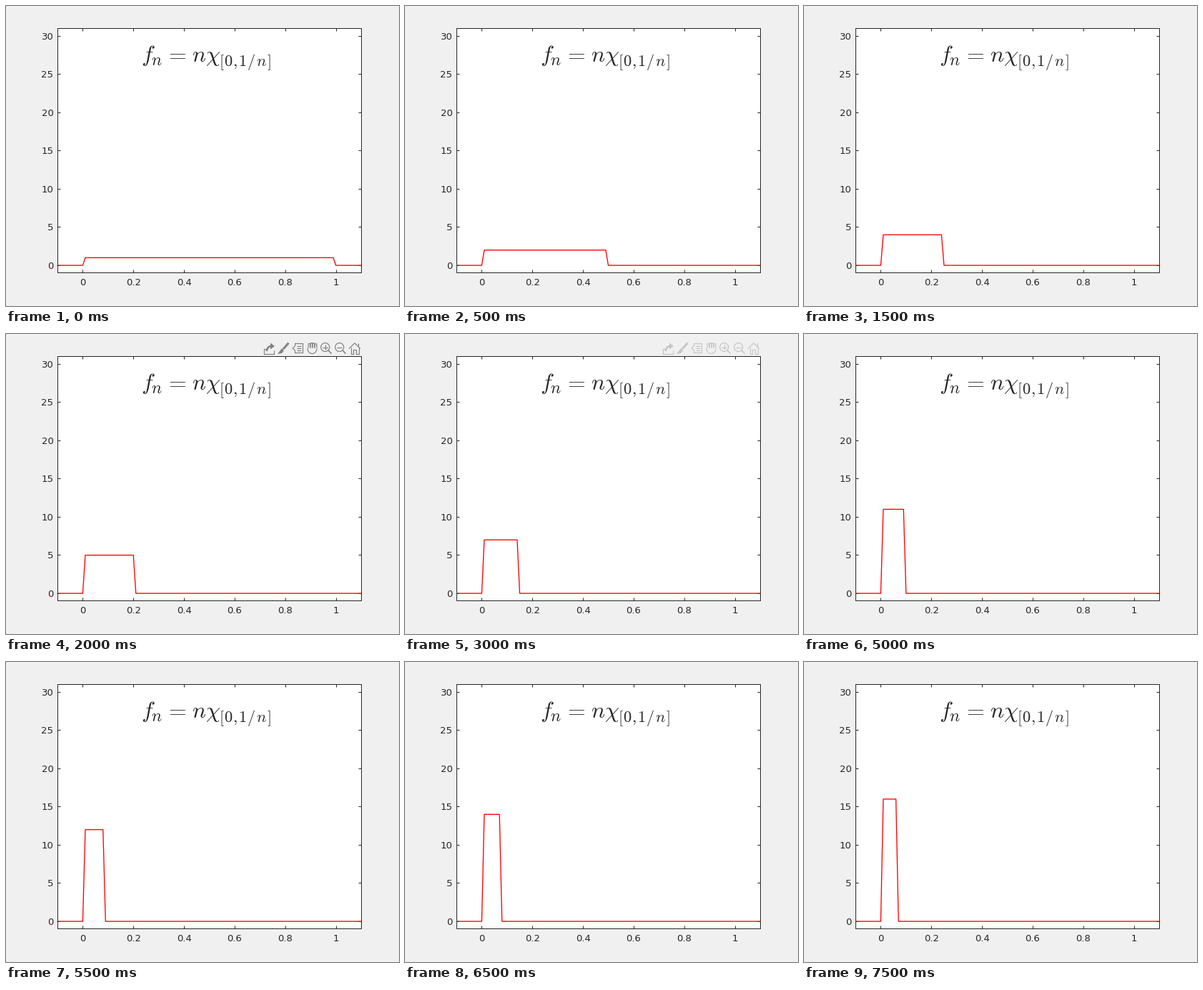
Recreate the animation shown at these times as a matplotlib script. Size 550 px wide and 420 px high, loop 8000 ms.

```python
import matplotlib.pyplot as plt
import numpy as np
from matplotlib.animation import FuncAnimation
from matplotlib.transforms import Affine2D

plt.rcParams.update({"font.family": "DejaVu Sans", "mathtext.fontset": "cm"})

W, H, DPI = 550, 420, 100
PX = 72 / DPI  # points per pixel
INK = "#262626"
LEFT, RIGHT, TOP, BOTTOM = 72, 497, 31.05, 373.45

fig = plt.figure(figsize=(W / DPI, H / DPI), dpi=DPI, facecolor="#f0f0f0")

# Plot
ax = fig.add_axes([LEFT / W, 1 - BOTTOM / H, (RIGHT - LEFT) / W, (BOTTOM - TOP) / H])
ax.set(xlim=(-0.1, 1.1), ylim=(-1, 31), facecolor="white")
ax.set_xticks(np.arange(6) / 5)
ax.set_yticks(range(0, 31, 5))
ax.xaxis.set_major_formatter(lambda v, pos: f"{v:g}")
ax.tick_params(direction="in", top=True, right=True, length=4 * PX, width=PX,
               color=INK, labelcolor=INK, labelsize=13.2 * PX)
ax.tick_params(axis="x", pad=8 * PX)
ax.tick_params(axis="y", pad=5.5 * PX)
for spine in ax.spines.values():
    spine.set(color=INK, linewidth=PX)

# The frame snaps to whole pixels, the curve sits a fraction lower.
x = -0.1 + 0.01 * np.arange(121)
curve, = ax.plot(x, 0 * x, color="red", lw=1.33 * PX,
                 transform=ax.transData + Affine2D().translate(0, -0.35))

# Pixel overlay for the formula and the toolbar
top = fig.add_axes([0, 0, 1, 1])
top.set(xlim=(0, W), ylim=(H, 0))
top.axis("off")

SIZE = 32
SUB = 0.7 * SIZE


def formula(left, base, tex, size=SIZE):
    top.text(left, base, f"${tex}$", size=size * PX, color=INK, va="baseline")


formula(188.7, 78, "f")
formula(203.3, 82.8, "n", 1.05 * SUB)
formula(222.3, 76.5, "=")
formula(260, 78, r"n\chi")
formula(298.4, 83.5, r"\hspace{0.065}".join(["[", "0", "{,}", "1", "/", "n", "]"]), SUB)

# Toolbar icons, each drawn around its own centre
icons = []
turn = np.linspace(0, 2 * np.pi, 49)


def stroke(cx, xs, ys, width=1.2):
    icons.extend(top.plot(cx + np.array(xs), 20 + np.array(ys), lw=width * PX,
                          solid_capstyle="butt", solid_joinstyle="round"))


def fill(cx, xs, ys):
    icons.extend(top.fill(cx + np.array(xs), 20 + np.array(ys), lw=0))


def export(cx):
    stroke(cx, [-4, -7, -7, 7, 7], [0.5, 0.5, 7.5, 7.5, 3])
    bend = turn[:13]
    stroke(cx, 3 - 6 * np.cos(bend), 4 - 7 * np.sin(bend), 2.6)
    fill(cx, [2, 8, 2], [-7.5, -3, 1.5])


def brush(cx):
    stroke(cx, [7.5, 0], [-7.5, 1], 3)
    fill(cx, [-2, 1, -2, -8], [0, 3, 7, 8])


def data_tip(cx):
    stroke(cx, [-3.5, -3.5, 7.5, 7.5, -3.5, -3.5, -7, -3.5],
           [-3, -6.5, -6.5, 6.5, 6.5, 3, 0, -3])
    for y in (-3, 0, 3):
        stroke(cx, [-1, 5], [y, y])


def hand(cx):
    for k in range(4):
        mid, tip = 3 * k - 3.5, abs(k - 1.4) - 7.8
        stroke(cx, [mid - 1.5, mid - 1.2, mid + 1.2, mid + 1.5], [-0.5, tip, tip, -0.5])
    palm = turn[:25]
    stroke(cx, 0.5 + 6.5 * np.cos(palm), 7.5 * np.sin(palm))


def zoom_out(cx):
    stroke(cx, 6 * np.cos(turn) - 1.3, 6 * np.sin(turn) - 1.5)
    stroke(cx, [3, 7.5], [2.8, 7.5], 1.6)
    stroke(cx, [-4.8, 2.2], [-1.5, -1.5])


def zoom_in(cx):
    zoom_out(cx)
    stroke(cx, [-1.3, -1.3], [-5, 2])


def home(cx):
    stroke(cx, [-8, 0, 8], [0.5, -7.2, 0.5])
    stroke(cx, [-5.5, -5.5, -1.8, -1.8, 1.8, 1.8, 5.5, 5.5],
           [-1.5, 7.5, 7.5, 2.2, 2.2, 7.5, 7.5, -1.5])
    stroke(cx, [4.5, 4.5], [-7, -3])


for k, icon in enumerate((export, brush, data_tip, hand, zoom_in, zoom_out, home)):
    icon(368 + 20 * k)


def draw(i):
    n = i + 1
    curve.set_ydata(np.where((x > 0) & (x < 1 / n), n, 0))
    # The toolbar shows for three steps and pales after the first.
    for part in icons:
        part.set(visible=5 <= n <= 7, color="#828282" if n == 5 else "#c6c6c6")
    return [curve, *icons]


anim = FuncAnimation(fig, draw, frames=16, interval=500, repeat=True, repeat_delay=0)
plt.show()
```
